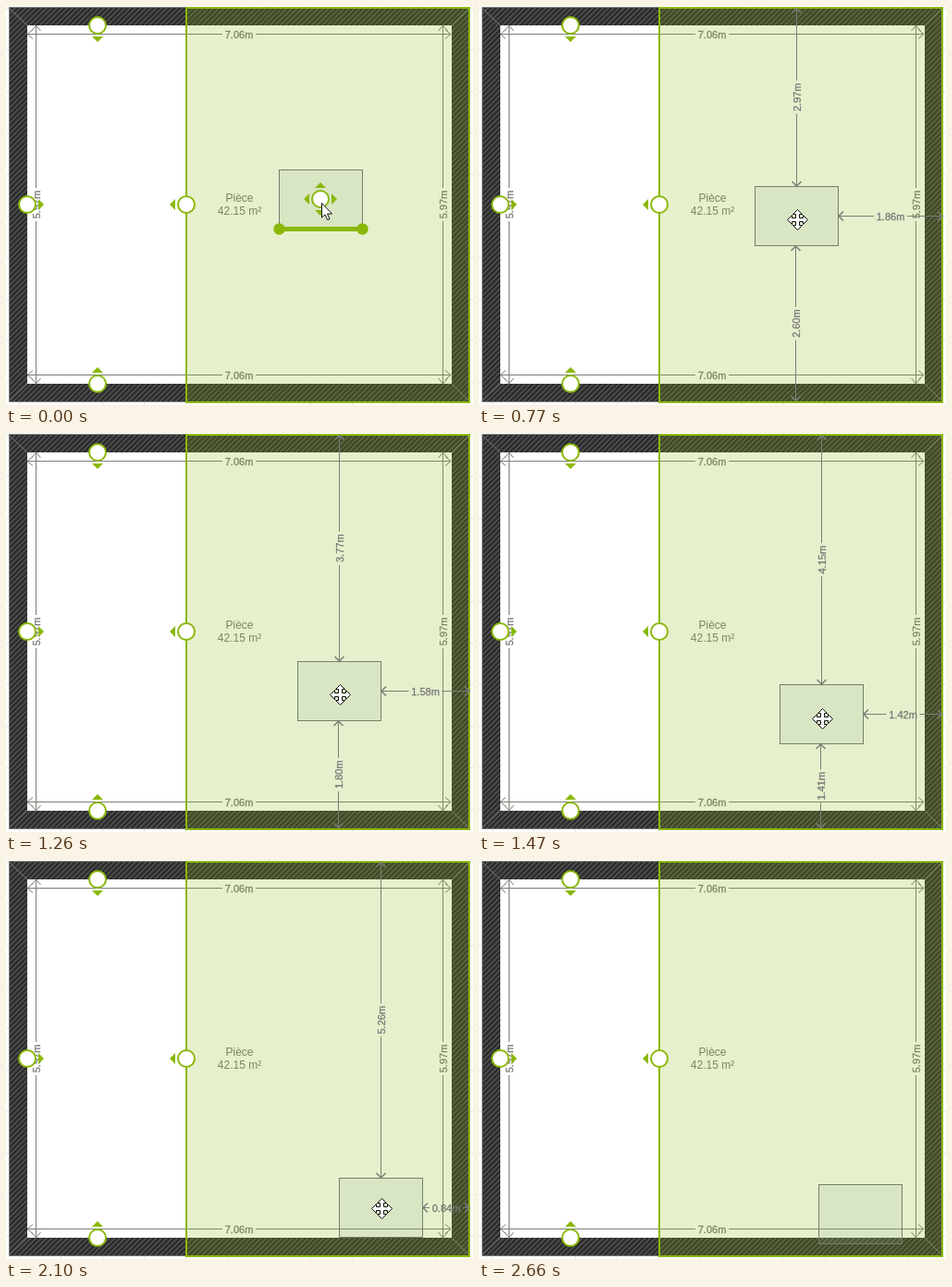
These frames come from a looping animation (505x432 px, 3.01 s). An HTML page:

```html
<!DOCTYPE html>
<html lang="fr">
<head>
<meta charset="utf-8">
<title>Plan de pièce</title>
<style>
  html, body { margin: 0; width: 100%; height: 100%; overflow: hidden; background: #fff; }
  svg { display: block; width: 505px; height: 432px; }
  text { font: 11px "Liberation Sans", Arial, sans-serif; fill: #777; text-anchor: middle; }
  .room { font-size: 12px; }
  .dim path { fill: none; stroke: #7b7e76; }
  .dim text { stroke: #777; stroke-width: .3; }
  #item .head { stroke-width: 1.5; }
  .green { fill: #8ab80a; }
  .ring { fill: #fff; stroke: #8ab80a; stroke-width: 2; }
  .cursor { fill: #fff; stroke: #111; }
</style>
</head>
<body>
<svg viewBox="0 0 505 432">
  <defs>
    <pattern id="hatch" width="4" height="4" patternUnits="userSpaceOnUse" patternTransform="rotate(45)">
      <rect width="4" height="4" fill="#2d2d2d"/>
      <rect width="1" height="4" fill="#606060"/>
    </pattern>
    <pattern id="grid" x="14" y="2" width="45" height="45" patternUnits="userSpaceOnUse">
      <path d="M.5 0V45M0 .5H45" stroke="#e3e7ea"/>
    </pattern>
  </defs>
  <rect width="505" height="432" fill="url(#grid)"/>
  <path d="M3.5 1.5H501.5V428.5H3.5Z" fill="url(#hatch)" stroke="#777"/>
  <path d="M3 2L23 21M501 2L482 21M3 428L23 409M501 428L482 409" stroke="#777"/>
  <rect x="23" y="21" width="459" height="388" fill="#fff"/>
  <g id="roomDims"></g>
  <text class="room" x="252.5" y="212">Pièce</text>
  <text class="room" x="252.5" y="226">42.15 m²</text>
  <rect x="195" y="2" width="306" height="427" fill="#8bb90f" fill-opacity=".21" stroke="#8ab80a" stroke-width="2"/>
  <g id="roomHandles"></g>
  <g id="item"></g>
</svg>
<script>
const LOOP = 3010, DRAG_START = 490, STEP = 70;
const BOX_W = 91, BOX_H = 65;
const LAST_DRAG = 27, LEAVE = 29, GONE = 31;

// step, box left, box top, cursor y
const keys = [
  [0, 295, 177, 215], [7, 304, 217, 251], [14, 325, 272, 308],
  [18, 342, 311, 345], [23, 360, 344, 376], [27, 367, 351, 384]
];

const el = id => document.getElementById(id);

function slope(i, c) {
  if (i === 0 || i === keys.length - 1) return 0;
  const a = keys[i - 1], b = keys[i + 1];
  return (b[c] - a[c]) / (b[0] - a[0]);
}

// Cubic Hermite through the keys, snapped to whole pixels
function track(step, c) {
  const s = Math.max(0, Math.min(step, LAST_DRAG));
  let i = 0;
  while (i < keys.length - 2 && s >= keys[i + 1][0]) i++;
  const a = keys[i], b = keys[i + 1], span = b[0] - a[0];
  const u = (s - a[0]) / span, v = 1 - u;
  return Math.round(a[c] * v * v * (1 + 2 * u) + b[c] * u * u * (3 - 2 * u)
    + span * u * v * (slope(i, c) * v - slope(i + 1, c) * u));
}

function dim(x1, y1, x2, y2, label, head = 6) {
  const vertical = x1 === x2, half = Math.abs(x2 - x1 + y2 - y1) / 2, gap = 18;
  if (half < gap) return '';
  const turn = vertical ? ' rotate(-90)' : '';
  return `<g class="dim" transform="translate(${(x1 + x2) / 2} ${(y1 + y2) / 2})${turn}">
    <path d="M${-half} 0H${-gap}M${gap} 0H${half}"/>
    <path class="head" d="M${head - half} -5L${-half} 0L${head - half} 5
      M${half - head} -5L${half} 0L${half - head} 5"/>
    <text y="4">${label}</text></g>`;
}

// Angles: 0 right, 90 down, 180 left, 270 up
function handle(x, y, angles) {
  const arrows = angles.map(a => `<path class="green" d="M12-6L18 0L12 6Z" transform="rotate(${a})"/>`);
  return `<g transform="translate(${x} ${y})"><circle class="ring" r="9"/>${arrows.join('')}</g>`;
}

function pointer(x, y) {
  return `<path class="cursor" transform="translate(${x} ${y})"
    d="M.5 .5V16L4 12.8L6.7 18.6L9 17.6L6.5 12H11.5Z"/>`;
}

function moveCursor(x, y) {
  const arm = [[-2, -2], [-2, -6], [-5, -6], [0, -11], [5, -6], [2, -6]];
  const points = [];
  for (let q = 0, p = arm; q < 4; q++, p = p.map(([a, b]) => [-b, a])) points.push(...p);
  return `<polygon class="cursor" points="${points.join(' ')}" transform="translate(${x} ${y})"/>`;
}

function drawItem(step) {
  const x = track(step, 1), y = track(step, 2), cursorY = track(step, 3);
  const cx = x + 45, cy = y + 32, right = x + BOX_W, bottom = y + BOX_H;
  const dragging = step >= 0 && step <= LAST_DRAG;
  const hovered = step < 0 || step > LAST_DRAG && step < LEAVE;
  const metres = n => n.toFixed(2) + 'm';
  let out = `<rect x="${x + .5}" y="${y + .5}" width="${BOX_W - 1}" height="${BOX_H - 1}"
    fill="#8fad92" fill-opacity=".15" stroke="#777f6a"/>`;

  if (dragging) {
    const above = (y - 2) / 65;
    out += dim(cx + .5, 2.5, cx + .5, y, metres(above), 5)
      + dim(cx - .5, bottom, cx - .5, 427.5, metres(5.568 - above), 5)
      + dim(right, cy + .5, 501, cy + .5, metres((411 - x) / 60.75), 5);
  }
  if (hovered) {
    out += `<path d="M${x} ${bottom - .5}h${BOX_W - 1}" stroke="#8ab80a" stroke-width="5"/>
      <circle class="green" cx="${x + .5}" cy="${bottom - .5}" r="6.2"/>
      <circle class="green" cx="${right - .5}" cy="${bottom - .5}" r="6.2"/>`;
  }
  if (hovered || step === 0) out += handle(cx, cy, [0, 90, 180, 270]);
  if (dragging) out += moveCursor(cx + 1.5, cursorY + 1.5);
  else if (step < GONE) out += pointer(cx + 1, cy + 4 + Math.max(0, step - LEAVE + 1) * 18);
  return out;
}

el('roomDims').innerHTML = dim(23, 30.5, 481, 30.5, '7.06m') + dim(23, 399.5, 481, 399.5, '7.06m')
  + dim(32.5, 21, 32.5, 409, '5.97m') + dim(472.5, 21, 472.5, 409, '5.97m');
el('roomHandles').innerHTML = handle(99, 21, [90]) + handle(99, 409, [270])
  + handle(23, 215, [0]) + handle(195, 215, [180]);

const start = performance.now();
let shown = null;

function render() {
  const t = (performance.now() - start) % LOOP;
  const step = Math.max(-1, Math.min(GONE, Math.floor((t - DRAG_START) / STEP)));
  if (step !== shown) {
    shown = step;
    el('item').innerHTML = drawItem(step);
  }
  requestAnimationFrame(render);
}
render();
</script>
</body>
</html>
```
